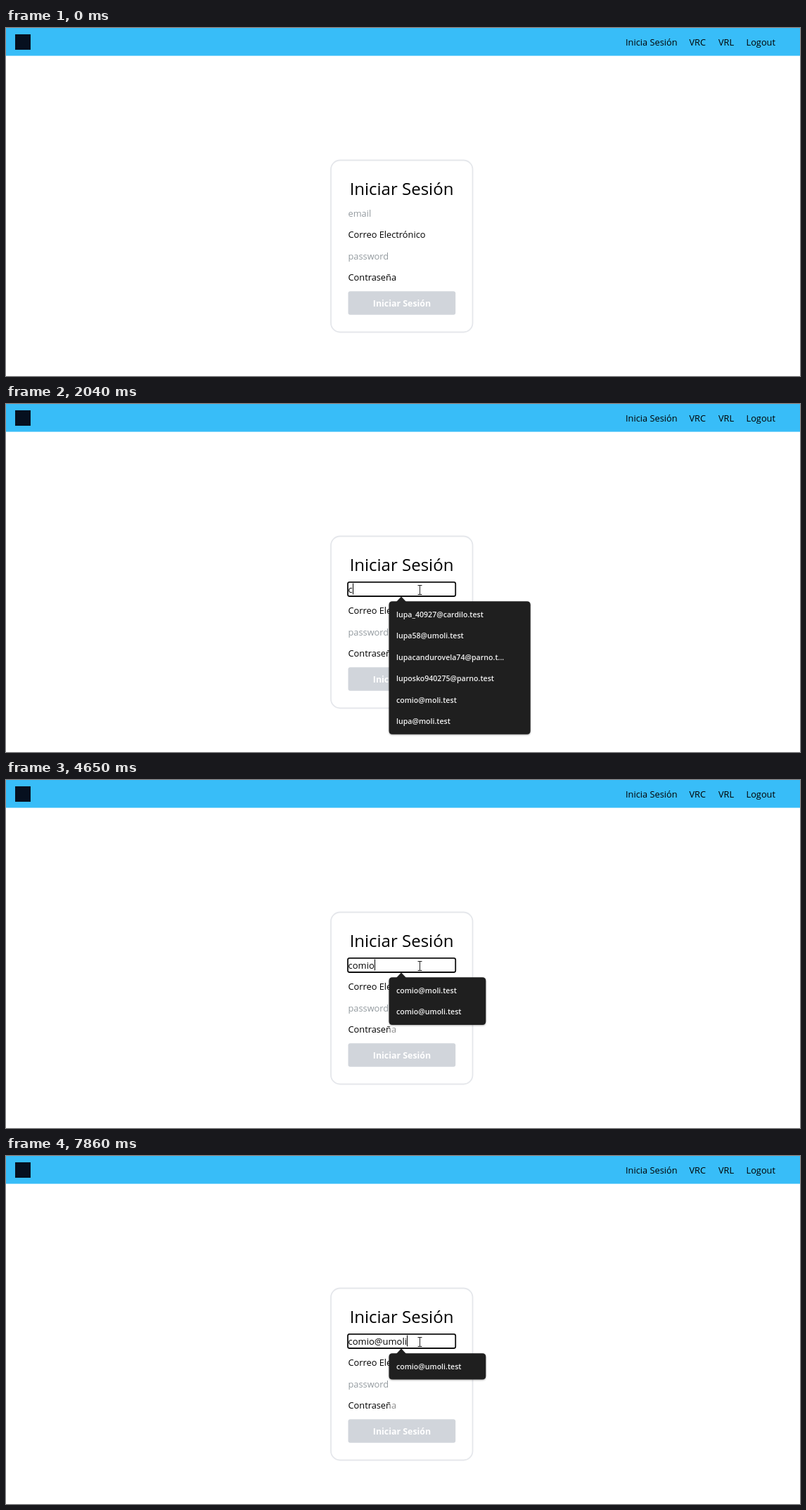
An HTML page that plays this animation: 1129x496 px, repeating every 8000 ms.

```html
<!DOCTYPE html>
<html lang="es">
<head>
<meta charset="utf-8">
<title>Iniciar Sesión</title>
<style>
  html, body { margin: 0; width: 100%; height: 100%; overflow: hidden; background: #fff; }
  svg { display: block; width: 1129px; height: 496px; font: 12.8px "Open Sans", "Noto Sans", sans-serif; }
  .hint { fill: #939a9f; }
  .shadow { filter: drop-shadow(0 1px 1px #0005); }
  #items { font-size: 10.6px; font-weight: 600; fill: #f1f1f1; }
</style>
</head>
<body>
<svg viewBox="0 0 1129 496">
  <rect width="1129" height="39.6" fill="#38bdf8"/>
  <rect x="13" y="9" width="22" height="22" fill="#06101f"/>
  <text x="881" y="24.5">Inicia Sesión</text>
  <text x="971.5" y="24.5">VRC</text>
  <text x="1013" y="24.5">VRL</text>
  <text x="1052.5" y="24.5">Logout</text>

  <rect x="462" y="188.5" width="201.5" height="245" rx="13" fill="#fff" stroke="#e5e7eb" stroke-width="1.8"/>
  <text x="562.5" y="238" font-size="24" text-anchor="middle">Iniciar Sesión</text>
  <text x="486.5" y="299">Correo Electrónico</text>
  <text x="486.5" y="329.5" class="hint">password</text>
  <text x="486.5" y="360">Contraseña</text>
  <rect id="fade" x="546" y="350" width="9" height="12" fill="#fff" opacity=".55"/>
  <rect x="486.5" y="375.2" width="152.7" height="33.5" rx="3" fill="#d1d5db"/>
  <text x="563" y="397" font-size="12.4" font-weight="700" fill="#fff" text-anchor="middle">Iniciar Sesión</text>

  <rect id="focus" x="486" y="253.8" width="153.2" height="20.2" rx="2.5" fill="none" stroke="#101010" stroke-width="1.8"/>
  <circle id="press" cx="586" cy="264.5" r="10" fill="#ffff80"/>
  <text id="hint" x="486.5" y="268.5" class="hint">email</text>
  <text id="typed" x="486.5" y="268.5" font-size="13"></text>
  <rect id="caret" y="255.5" width="1" height="16"/>

  <g id="popup">
    <path id="panel" fill="#1f1f1f"/>
    <path d="M554.5 282.5L562 274.5L569.5 282.5Z" fill="#1f1f1f"/>
    <g id="items"></g>
  </g>

  <path id="arrow" d="M0 0V15.5L3.6 12.2L6 17.8L8.4 16.8L6 11.3H11Z" fill="#fff" stroke="#000" stroke-width=".9"/>
  <path id="beam" d="M-2.5 -6.5H3.5M.5 -6.5V6.5M-2.5 6.5H3.5" fill="none" stroke="#222"/>
</svg>
<script>
const DURATION = 8000;
const ADDRESS = 'comio@umoli';
const saved = ['lupa_40927@cardilo.test', 'lupa58@umoli.test', 'lupacandurovela74@parno.t...',
  'luposko940275@parno.test', 'comio@moli.test', 'lupa@moli.test'];
const matches = ['comio@moli.test', 'comio@umoli.test'];

// Popup layouts: items, right edge, bottom edge, bottom corner radius
const all = [saved, 745.7, 470.7, 5];
const cut = [saved.slice(0, 2), 686, 354, 0];
const cutMatches = [matches, 686, 354, 0];
const two = [matches, 682.3, 349, 5];
const one = [matches.slice(1), 682.3, 318.5, 5];

// Start time, letters typed, caret visible, popup layout
const steps = [
  [0, 0, false, null], [970, 0, false, all],
  [2040, 1, true, all], [2080, 1, true, cut], [2110, 2, true, cutMatches], [2210, 2, true, two],
  [2570, 3, true, two], [2940, 4, true, two], [3470, 4, false, two], [4000, 4, true, two],
  [4520, 4, false, two], [4650, 5, true, two], [5190, 5, false, two], [5710, 5, true, two],
  [6060, 6, true, two], [6610, 6, false, two],
  [7010, 7, true, one], [7290, 8, true, one], [7460, 9, true, one], [7660, 10, true, one], [7860, 11, true, one]
];

const el = id => document.getElementById(id);
const show = (id, on) => { el(id).style.display = on ? '' : 'none'; };

function drawPopup([items, right, bottom, r]) {
  el('panel').setAttribute('d', `M549.5 281.3H${right - 5}q5 0 5 5V${bottom - r}q0 ${r} ${-r} ${r}` +
    `H${544.5 + r}q${-r} 0 ${-r} ${-r}V286.3q0 -5 5 -5Z`);
  el('popup').classList.toggle('shadow', r > 0);
  el('items').innerHTML = items
    .map((item, i) => `<text x="555" y="${304 + 30.4 * i}">${item}</text>`).join('');
}

function drawMouse(t) {
  const p = Math.min(1, Math.max(0, Math.floor((t - 20) / 38.1) / 16));
  const eased = p * p * (3 - 2 * p);
  const x = Math.round(960 - 372 * eased), y = Math.round(396 - 131 * eased);
  const overInput = x < 640 && y < 275;
  show('arrow', t >= 20 && !overInput);
  show('beam', overInput);
  for (const id of ['arrow', 'beam']) el(id).setAttribute('transform', `translate(${x} ${y})`);
  show('press', t >= 860 && t < 1020);
}

let current;
function drawForm(t) {
  const step = steps.findLast(s => s[0] <= t);
  if (step === current) return;
  current = step;
  const [time, letters, caret, popup] = step;
  const typed = el('typed');
  typed.textContent = ADDRESS.slice(0, letters);
  el('caret').setAttribute('x', Math.round(486.5 + typed.getComputedTextLength()));
  show('caret', caret);
  show('hint', !letters);
  show('focus', popup);
  show('fade', time >= 2080);
  show('popup', popup);
  if (popup) drawPopup(popup);
}

const start = performance.now();
function frame() {
  const t = (performance.now() - start) % DURATION;
  drawMouse(t);
  drawForm(t);
  requestAnimationFrame(frame);
}
frame();
</script>
</body>
</html>
```
